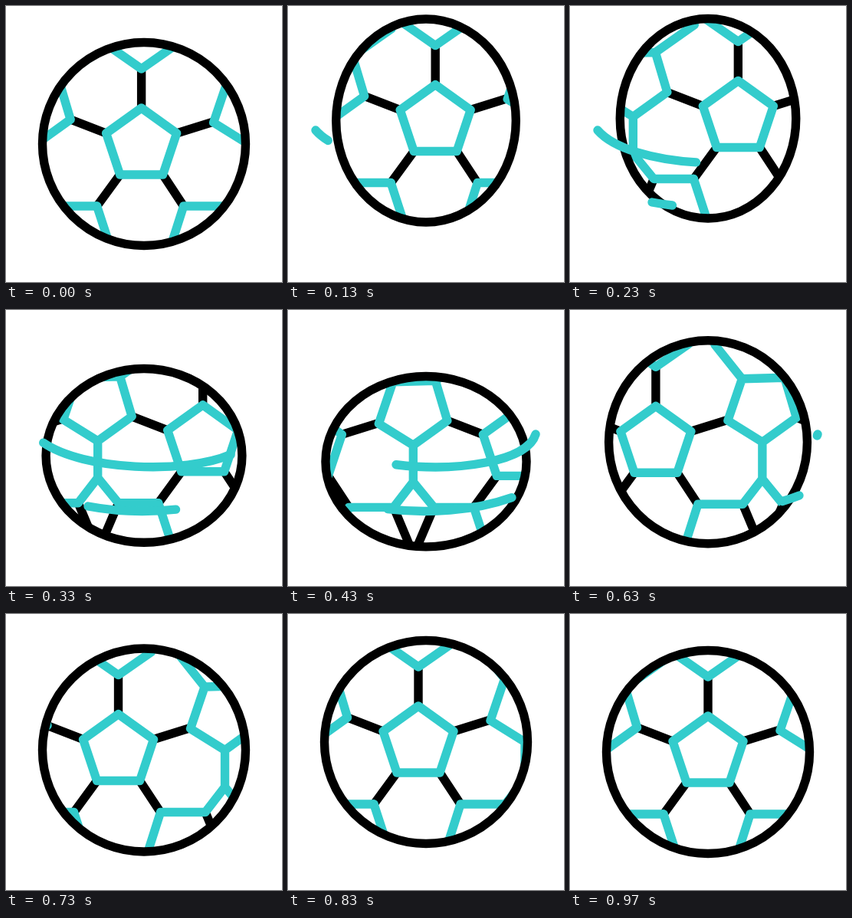
Recreate the animation shown at these times as an HTML page. Size 360 by 360 pixels, loop 1.67 s.

```html
<!DOCTYPE html>
<html lang="en">
<head>
<meta charset="utf-8">
<title>Bouncing ball</title>
<style>
  html, body { margin: 0; width: 100%; height: 100%; overflow: hidden; background: #fff; }
  svg { display: block; width: 100vw; height: 100vh; }
  .line { fill: none; stroke-width: 11.4; stroke-linecap: round; stroke-linejoin: round; }
  .ink { stroke: #000; }
  .teal { stroke: #3cc; }
</style>
</head>
<body>
<svg viewBox="0 0 360 360">
  <defs>
    <clipPath id="inside"><ellipse class="shell"/></clipPath>
    <path id="seams" class="line ink" d="M0-47V-98 M46-14L94-29 M-46-14L-92.5-32 M28 40L55 81 M-28 40L-58 81
      M113.5 81L134 130 M166 81L146 128"/>
    <path id="patches" class="line teal" d="M0-47L46-14 28 40-28 40-46-14Z M-43-128L0-98 43-128
      M-43 127L-58 81 M40 128L55 81H113.5L139 48 166 81H218 M139 48V0
      M112.5-82.5L168-84 183.5-32 139 0 94-28Z M77-127L112.5-82.5 M168-84L219-120"/>
  </defs>
  <g clip-path="url(#inside)">
    <g id="skin">
      <use href="#seams"/>
      <use href="#seams" x="-276"/>
      <use href="#seams" x="-552"/>
      <use href="#patches"/>
      <use href="#patches" x="-276"/>
      <use href="#patches" x="-552"/>
    </g>
  </g>
  <ellipse class="shell line ink"/>
  <path id="upper" class="line teal" pathLength="1" d="M36 162C85 219 306 219 323 162"/>
  <path id="lower" class="line teal" pathLength="1" d="M107 256C165 267 240 265 299 242"/>
</svg>
<script>
  const LOOP = 1670, LAST = 29, RADIUS = 132.5;
  const $ = id => document.getElementById(id);
  const shells = document.querySelectorAll('.shell');
  const skin = $('skin'), upper = $('upper'), lower = $('lower');

  // step, height above the floor, narrowing of the sides, squash of the top
  const bounce = [
    [0, 0, 0, 0], [5.8, 39, 19.5, 0], [12, 0, 0, 25], [16, 25, 10, 0],
    [20.8, 0, 0, 0], [25, 13, 0, 0], [29, 0, 0, 0]
  ];

  // Sine ease from 0 to 1 between two steps
  function ease(k, from, to) {
    const u = Math.min(1, Math.max(0, (k - from) / (to - from)));
    return (1 - Math.cos(Math.PI * u)) / 2;
  }

  function pose(k) {
    let i = 0;
    while (i < bounce.length - 2 && k > bounce[i + 1][0]) i++;
    const a = bounce[i], b = bounce[i + 1];
    const p = ease(k, a[0], b[0]);
    return a.map((v, n) => v + (b[n] - v) * p).slice(1);
  }

  function trim(path, start, end) {
    const length = end - start;
    path.style.display = length > 0.0005 ? '' : 'none';
    path.setAttribute('stroke-dasharray', `${length} 2`);
    path.setAttribute('stroke-dashoffset', -start);
  }

  function draw(time) {
    // The motion runs at 30 steps a second, then rests
    const k = Math.min(LAST, Math.floor((time % LOOP) * 0.03 + 0.1));
    const [height, narrow, squash] = pose(k);
    const y = 180 - height;
    for (const shell of shells) {
      shell.setAttribute('cx', 180);
      shell.setAttribute('cy', y + squash);
      shell.setAttribute('rx', RADIUS - narrow);
      shell.setAttribute('ry', RADIUS - squash);
    }
    const x = 176.5 + 279.5 * ease(k, -0.4, 28.5);
    skin.setAttribute('transform', `translate(${x} ${y})`);
    trim(upper, ease(k, 8.3, 19.6), ease(k, 2.3, 12.4));
    trim(lower, ease(k, 10.55, 21.45), ease(k, 4.7, 14.2));
  }

  const begin = performance.now();
  function tick() {
    draw(performance.now() - begin);
    requestAnimationFrame(tick);
  }
  tick();
</script>
</body>
</html>
```
